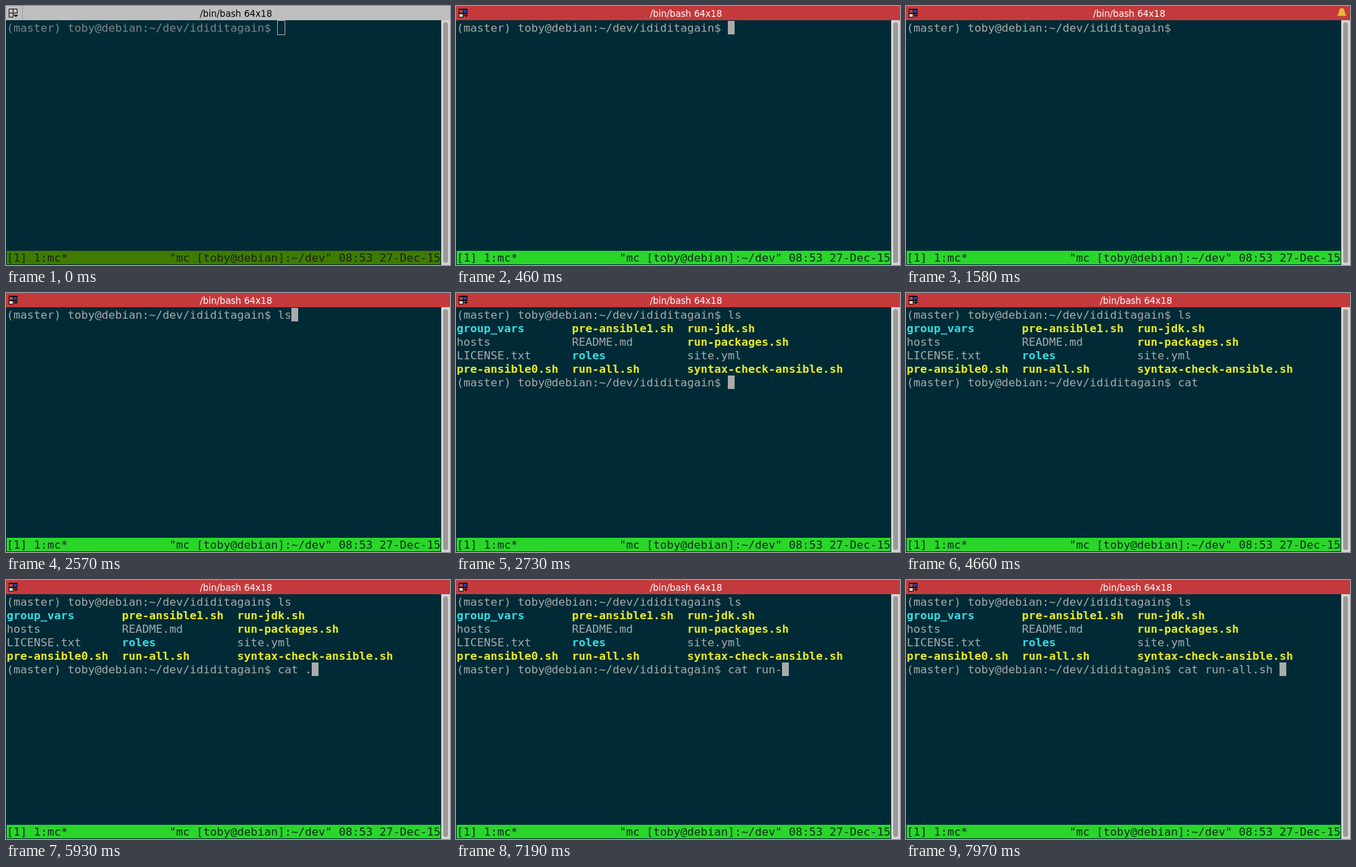
These frames come from a looping animation (655x383 px, 8 s). An HTML page with a canvas:

```html
<!DOCTYPE html>
<html lang="en">
<head>
<meta charset="utf-8">
<title>Terminal</title>
<style>
  html, body { margin: 0; width: 100%; height: 100%; overflow: hidden; background: #002b36; }
  canvas { display: block; }
</style>
</head>
<body>
<canvas id="stage" width="655" height="383"></canvas>
<script>
const ctx = document.getElementById('stage').getContext('2d', { alpha: false });
const LOOP = 8000, FOCUS = 460, LISTED = 2730, BELL = [1580, 2570];
const CELL = 10, ROW = 20, LEFT = 1, TOP = 22;
const MONO = '16.6px "DejaVu Sans Mono", monospace';
const PROMPT = '(master) toby@debian:~/dev/ididitagain$ ';
const STATUS = '[1] 1:mc*'.padEnd(24) + '"mc [toby@debian]:~/dev" 08:53 27-Dec-15';

const BLURRED = { bar: '#c0bebf', title: '#000', text: '#7c8688', status: '#3f7b00', ink: '#18240f' };
const FOCUSED = { bar: '#c43a3c', title: '#fff', text: '#a8abab', status: '#2ad62a', ink: '#0a2a16' };
const CYAN = '#34dfe6', YELLOW = '#ecec22';

const LISTING = [
  ['group_vars', 'pre-ansible1.sh', 'run-jdk.sh'],
  ['hosts', 'README.md', 'run-packages.sh'],
  ['LICENSE.txt', 'roles', 'site.yml'],
  ['pre-ansible0.sh', 'run-all.sh', 'syntax-check-ansible.sh']
];

// [time, command line from then on]
const TYPED = [
  [0, ''], [2290, 'l'], [2370, 'ls'],
  [LISTED, ''], [3580, 'c'], [3760, 'ca'], [3970, 'cat'], [4100, 'cat '],
  [4770, 'cat .'], [6190, 'cat '], [6830, 'cat r'], [6910, 'cat ru'],
  [7090, 'cat run'], [7190, 'cat run-'], [7790, 'cat run-a'], [7970, 'cat run-all.sh ']
];
const CURSOR_OFF = [[1000, 2290], [3280, 3580], [4660, 4770], [5330, 5930], [6750, 6830], [7740, 7790]];

const within = (t, [from, to]) => t >= from && t < to;

function box(color, x, y, w, h) {
  ctx.fillStyle = color;
  ctx.fillRect(x, y, w, h);
}

function shape(color, path) {
  ctx.fillStyle = color;
  ctx.fill(new Path2D(path));
}

function print(text, col, row, color, bold) {
  ctx.font = (bold ? 'bold ' : '') + MONO;
  ctx.fillStyle = color;
  [...text].forEach((ch, i) => ctx.fillText(ch, LEFT + (col + i) * CELL, TOP + row * ROW + 16));
}

function drawGroupIcon(focused) {
  if (focused) {
    box('#111', 4, 4, 13, 8);
    box('#111', 4, 11, 7, 6);
    box('#b8474a', 5, 6, 5, 4);
    box('#2340a8', 11, 6, 5, 4);
    box('#d8d8d8', 5, 12, 5, 4);
  } else {
    ctx.strokeStyle = '#111';
    ctx.lineWidth = 1;
    ctx.stroke(new Path2D('M10.5 16.5H4.5V4.5H16.5V10.5H4.5M10.5 4.5V16.5'));
    box('#a3a1a2', 24, 0, 1, 21);
  }
  shape('#111', 'M11 13H18L14.5 16.5Z');
}

function drawBell() {
  shape('#e8b93c', 'M643 3C639.5 3 639 7 638.5 10C638 12 636.5 13 636 14.5H650C649.5 13 648 12 647.5 10C647 7 646.5 3 643 3Z');
  shape('#8f6512', 'M641 15H645A2 2 0 0 1 641 15Z');
}

function drawTitle(t, look) {
  const ringing = within(t, BELL);
  box(look.bar, 0, 0, 655, 21);
  drawGroupIcon(look === FOCUSED);
  ctx.font = '13.2px "DejaVu Sans", sans-serif';
  ctx.fillStyle = look.title;
  ctx.fillText('/bin/bash 64x18', ringing ? 276 : 286, 16);
  if (ringing) drawBell();
}

function drawScrollbar() {
  box('#d6d5d5', 642, 21, 13, 362);
  ctx.fillStyle = '#999';
  ctx.beginPath();
  ctx.roundRect(645, 24, 7, 356, 3.5);
  ctx.fill();
}

function drawListing(look) {
  print(PROMPT + 'ls', 0, 0, look.text);
  LISTING.forEach((names, row) => names.forEach((name, i) => {
    const color = name.endsWith('.sh') ? YELLOW : /^(group_vars|roles)$/.test(name) ? CYAN : null;
    print(name, i * 17, row + 1, color || look.text, color);
  }));
}

function drawCursor(t, look, col, row) {
  const x = LEFT + col * CELL, y = TOP + row * ROW;
  if (look === BLURRED) {
    ctx.strokeStyle = '#aaa';
    ctx.lineWidth = 1;
    ctx.strokeRect(x - 0.5, y - 0.5, CELL + 1, ROW + 1);
  } else if (!CURSOR_OFF.some(span => within(t, span))) {
    box('#aaa', x, y, CELL, ROW);
  }
}

function draw(now) {
  const t = now % LOOP;
  const look = t < FOCUS ? BLURRED : FOCUSED;
  const row = t < LISTED ? 0 : 5;
  const line = PROMPT + TYPED.findLast(([time]) => time <= t)[1];

  box('#002b36', 0, 0, 655, 383);
  drawTitle(t, look);
  drawScrollbar();
  if (row) drawListing(look);
  print(line, 0, row, look.text);
  drawCursor(t, look, line.length, row);
  box(look.status, LEFT, 362, 640, ROW);
  print(STATUS, 0, 17, look.ink);
  requestAnimationFrame(draw);
}
requestAnimationFrame(draw);
</script>
</body>
</html>
```
